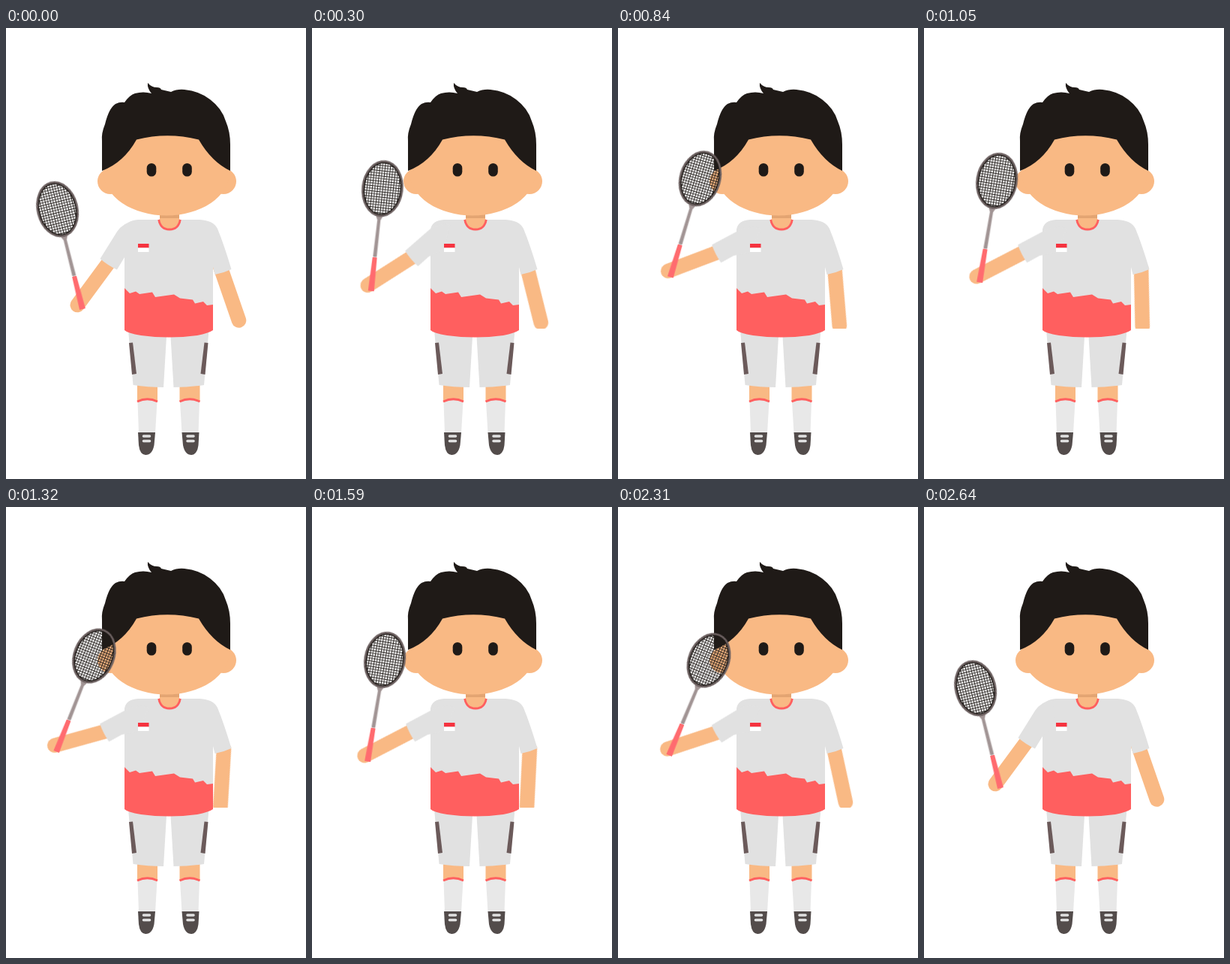
Write an HTML page that moves like this. It is 400 px wide and 600 px high and loops after 2.67 s.

```html
<!DOCTYPE html>
<html lang="en">
<head>
<meta charset="utf-8">
<title>Badminton player</title>
<style>
  html, body { margin: 0; width: 100%; height: 100%; overflow: hidden; background: #fff; }
  svg { display: block; width: 100%; height: 100%; }

  .skin { fill: #f9b984; }
  .ink { fill: #1f1a17; }
  .cloth { fill: #e1e1e1; }
  .red { fill: #ff5f5f; }
  .sock { fill: #e8e8e8; }
  .stripe { fill: #6b5a5a; }
  .shoe { fill: #534c4b; }
  .limb { fill: none; stroke: #f9b984; stroke-width: 19.6; stroke-linecap: round; }
  .trim { fill: none; stroke: #ff5f5f; stroke-width: 2.8; }
  .lace { fill: none; stroke: #e1e1e1; stroke-width: 3.6; stroke-linecap: round; }

  .sleeve, .forearm, .racket, .free { animation: 2670ms infinite ease-in-out; }
  .sleeve  { transform-origin: 160px 297px; animation-name: sleeve; }
  .forearm { transform-origin: 137px 312px; animation-name: forearm; }
  .racket  { transform-origin: 95px 369px; animation-name: racket; }
  .free    { transform-origin: 275px 332px; animation-name: free; animation-timing-function: linear; }

  @keyframes sleeve {
    0%, 98.88%, 100% { transform: rotate(0deg); }
    21%, 80.15% { transform: rotate(30deg); animation-timing-function: ease-in; }
    86.52% { transform: rotate(27deg); animation-timing-function: ease-out; }
  }
  /* Relative to the sleeve */
  @keyframes forearm {
    0%, 98.88%, 100% { transform: rotate(0deg); }
    21% { transform: rotate(7.5deg); }
    23.6% { transform: rotate(8.5deg); }
    40.2% { transform: rotate(-3.8deg); }
    50% { transform: rotate(8.2deg); }
    60% { transform: rotate(-3.8deg); }
    80.15% { transform: rotate(9.3deg); }
    86.52% { transform: rotate(8.5deg); animation-timing-function: ease-out; }
  }
  @keyframes racket {
    0%, 98.88%, 100% { transform: rotate(0deg); }
    22.5% { transform: rotate(-1.3deg); }
    40%, 60% { transform: rotate(-2.5deg); }
    73% { transform: rotate(-1.7deg); }
    86.52% { transform: rotate(1.5deg); }
  }
  @keyframes free {
    0%, 98.88%, 100% { transform: rotate(0deg); }
    54.5% { transform: rotate(24.8deg); }
  }
</style>
</head>
<body>
<svg viewBox="0 0 400 600">
  <defs>
    <clipPath id="cut"><rect width="400" height="400"/></clipPath>
    <pattern id="mesh" width="3.5" height="3.5" patternUnits="userSpaceOnUse">
      <path class="ink" d="M0 0H3.5V.9H.9V3.5H0Z"/>
    </pattern>
    <g id="leg">
      <rect class="skin" x="175" y="470" width="27" height="27"/>
      <path class="sock" d="M175.500 497Q188.500 490.500 201.500 497L199 539H177Z"/>
      <path class="trim" d="M175 497Q188.500 490.500 202 497"/>
      <path class="shoe" d="M176 538H199L197.500 555Q195 568 186 568Q178.500 567.500 177 555Z"/>
      <path class="lace" d="M183.500 543H191.500M183.500 549.500H191.500"/>
      <path class="cloth" d="M163 402H214.500L210 478Q189 478 169.500 475Z"/>
      <path class="stripe" d="M164 419L169 418.500L174 460L168 461Z"/>
    </g>
  </defs>

  <use href="#leg"/>
  <use href="#leg" transform="matrix(-1 0 0 1 433.500 0)"/>

  <g clip-path="url(#cut)">
    <path class="limb free" d="M285.500 317L310.500 389"/>
  </g>

  <rect class="skin" x="205" y="240" width="26" height="20"/>
  <rect x="205" y="246" width="26" height="7" fill="#e3a472"/>

  <g class="skin">
    <circle cx="139" cy="204" r="17"/>
    <circle cx="290" cy="204" r="17"/>
    <ellipse cx="214" cy="192" rx="84" ry="57.500"/>
  </g>
  <path class="ink" d="M128 190V150Q127 140 132 128Q137 107 146 101Q152 98 158 99Q165 89 172 87Q183 84 194 87Q188 80 189 73Q194 79 201 79Q206 79 207 82L220 85Q228 81 238 82Q258 84 272 95Q288 107 293 124Q299 138 299 155V190Q274 178 257 148.500Q215 138 174 148.500Q157 179 128 190Z"/>
  <rect class="ink" x="187.700" y="180" width="12.600" height="17.500" rx="6.300"/>
  <rect class="ink" x="235.200" y="180" width="12.600" height="17.500" rx="6.300"/>

  <path class="cloth" d="M158 268Q160 256 176 255H258Q277 256 282 267Q291 289 300.500 321Q290 326 278.500 328L276 318V380H158Z"/>
  <path class="red" d="M158 346L165 353L173 350.500L178 354L195 351.500L199 358L224 354.500L232 359.500L249 361.500L252 366.500L263 364L268 369L276 368V402Q270 406 255 409Q217 414 180 409Q162 406 158 402Z"/>
  <path class="skin" d="M204 254.500H232Q231 268 218 268Q205 268 204 254.500Z"/>
  <path class="trim" d="M203.700 255Q206 268 218 268Q230 268 232.300 255"/>

  <g class="sleeve">
    <g class="forearm">
      <path class="limb" d="M137 312L95.300 368.500"/>
      <g class="racket">
        <g transform="translate(102 374) rotate(-14.100)">
          <path d="M-2 -46L-1.700 -95L-5 -102H5L1.700 -95L2 -46Z" fill="#a19494" stroke="#a19494"/>
          <path d="M-3 -45H3L4 0H-4Z" fill="#ff6b6f"/>
          <ellipse cy="-137" rx="25" ry="35" fill="url(#mesh)"/>
          <ellipse cy="-137" rx="24.700" ry="34.700" fill="none" stroke="#1f1a17" stroke-width="2"/>
          <ellipse cy="-137" rx="26.500" ry="36.500" fill="none" stroke="#6b5f5f" stroke-width="2.400"/>
        </g>
      </g>
    </g>
    <path class="cloth" d="M172 256Q156 259 148 271L125.500 307Q136 316 148 321.500L158 305L175 290Z"/>
  </g>

  <rect x="176" y="287" width="14.500" height="5.500" fill="#f5333f"/>
  <rect x="176" y="292.500" width="14.500" height="5.500" fill="#fff"/>
</svg>
</body>
</html>
```
